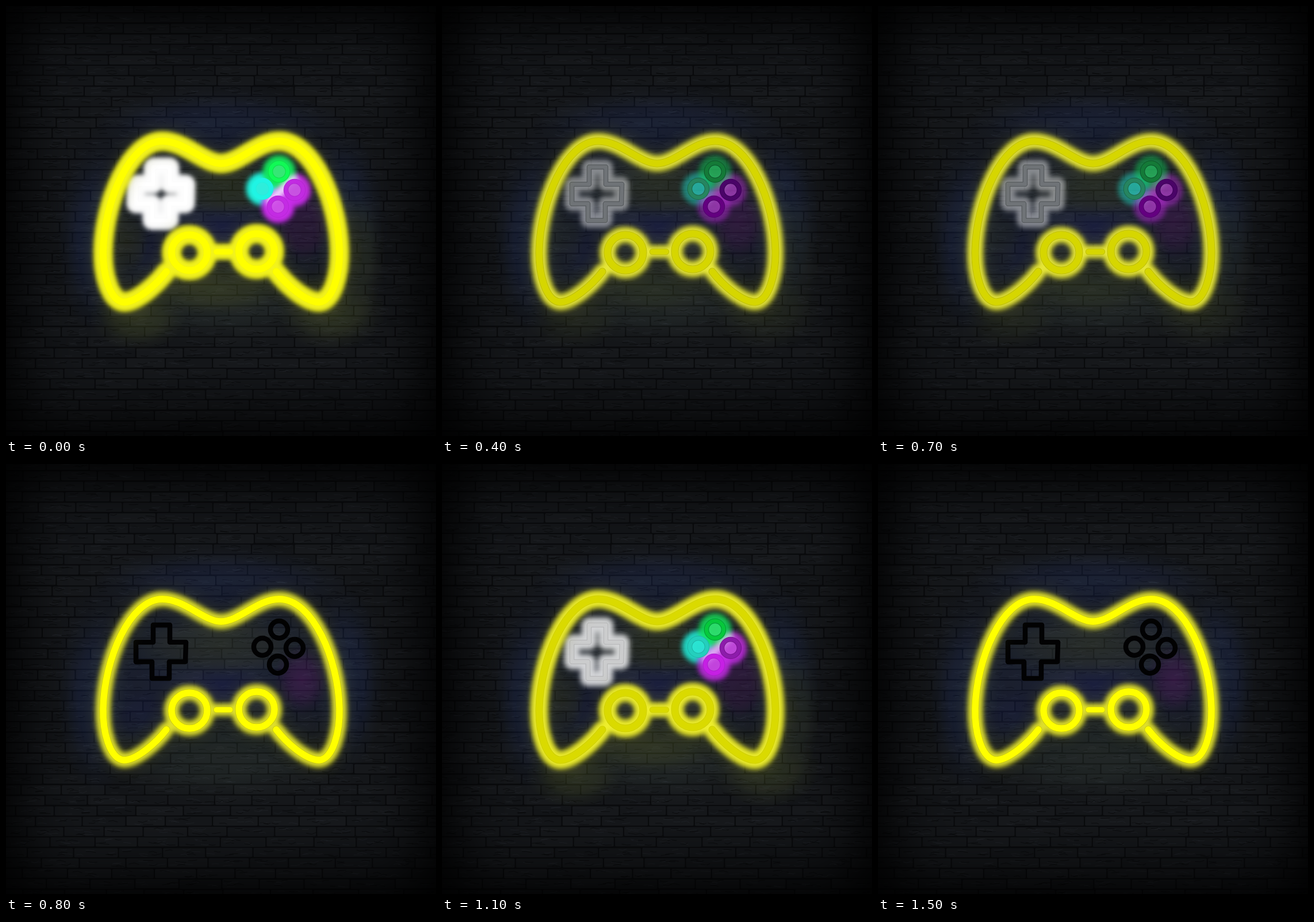
An HTML page with a canvas that plays this animation: 748 by 748 pixels, repeating every 1.6 s.

```html
<!DOCTYPE html>
<html lang="en">
<head>
<meta charset="utf-8">
<title>Neon gamepad</title>
<style>
html, body { margin: 0; width: 100%; height: 100%; overflow: hidden; background: #000; }
#stage { position: relative; width: 748px; height: 748px; overflow: hidden; isolation: isolate; }
#stage > * { position: absolute; left: 0; top: 0; width: 748px; height: 748px; }
#shade { box-shadow: inset 0 0 100px 28px #000; }
#air { mix-blend-mode: screen; }
path, circle, line { fill: none; stroke-linecap: round; stroke-linejoin: round; }
.soft { filter: blur(4.5px); }
.haze { filter: blur(12px); }
</style>
</head>
<body>
<div id="stage">
  <canvas id="wall" width="748" height="748"></canvas>
  <div id="shade"></div>
  <svg id="air" viewBox="0 0 748 748"></svg>
  <svg id="sign" viewBox="0 0 748 748"></svg>
</div>
<script>
const FRAME = 100, COUNT = 16;
// Brightness stage per step: 0 fully lit, 1 dimming, 2 faint, 3 off.
const FLICKER = [0, .5, 1, 1.5, 2, 2.5, 3, 2, 3];

const air = document.getElementById('air');
const sign = document.getElementById('sign');

function add(parent, tag, attrs = {}) {
  const el = document.createElementNS('http://www.w3.org/2000/svg', tag);
  for (const key in attrs) el.setAttribute(key, attrs[key]);
  return parent.appendChild(el);
}

const rgb = hex => [1, 3, 5].map(i => parseInt(hex.slice(i, i + 2), 16));
const lerp = (a, b, t) => a + (b - a) * t;

function mix(a, b, t) {
  if (typeof a === 'number') return lerp(a, b, t);
  const q = rgb(b);
  return `rgb(${rgb(a).map((v, i) => Math.round(lerp(v, q[i], t))).join(',')})`;
}

function flicker(el, prop, stages) {
  const frames = [];
  for (let i = 0; i <= COUNT; i++) {
    const k = FLICKER[Math.min(i, COUNT - 1) % FLICKER.length];
    const lo = Math.floor(k), hi = Math.ceil(k);
    frames.push({ [prop]: mix(stages[lo], stages[hi], k - lo), offset: i / COUNT, easing: 'step-end' });
  }
  el.animate(frames, { duration: FRAME * COUNT, iterations: Infinity }).startTime = 0;
}

function drawWall() {
  const c = document.getElementById('wall').getContext('2d');
  let seed = 71;
  const rnd = () => (seed = seed * 16807 % 2147483647) / 2147483647;
  c.fillStyle = '#0a0b0d';
  c.fillRect(0, 0, 748, 748);
  const rowH = 18.2;
  for (let row = 0; row < 42; row++) {
    const y = row * rowH - 6;
    let x = -(row % 2) * 38 - rnd() * 16;
    while (x < 748) {
      const w = 64 + rnd() * 20, v = 19 + rnd() * 4;
      c.fillStyle = `rgb(${v},${v + 2},${v + 5})`;
      c.beginPath();
      c.roundRect(x, y + rnd(), w - 2, rowH - 2.2, 2);
      c.fill();
      for (let n = 0; n < 6; n++) {
        const px = x + rnd() * (w - 18), py = y + 3 + rnd() * 11;
        c.strokeStyle = n % 2 ? 'rgba(0,0,0,.45)' : 'rgba(70,74,82,.18)';
        c.lineWidth = 1;
        c.beginPath();
        c.moveTo(px, py);
        c.lineTo(px + 5 + rnd() * 5, py + rnd() * 4 - 2);
        c.lineTo(px + 11 + rnd() * 7, py + rnd() * 4 - 2);
        c.stroke();
      }
      x += w;
    }
  }
}

const defs = add(air, 'defs');
let blobs = 0;
function blob(x, y, rx, ry, color, stages) {
  const id = 'b' + blobs++;
  const g = add(defs, 'radialGradient', { id });
  [[0, 1], [.5, .65], [.8, .18], [1, 0]].forEach(([offset, a]) =>
    add(g, 'stop', { offset, 'stop-color': color, 'stop-opacity': a }));
  const el = add(air, 'ellipse', { cx: x, cy: y, rx, ry, fill: `url(#${id})` });
  if (stages) flicker(el, 'opacity', stages);
}

function drawAir() {
  blob(374, 350, 300, 220, '#080d20');
  blob(374, 205, 220, 55, '#060b1c');
  blob(160, 410, 70, 160, '#070e24');
  blob(590, 380, 65, 160, '#070e24');
  blob(375, 385, 110, 50, '#080a28');
  blob(240, 445, 60, 60, '#060920');
  blob(370, 315, 190, 65, '#161912');
  blob(515, 375, 50, 62, '#260a32');
  blob(375, 500, 250, 90, '#0f130e');
  const warm = [1, .9, .5, 0];
  blob(230, 540, 85, 60, '#1e220c', warm);
  blob(565, 530, 95, 70, '#1e220c', warm);
  blob(360, 490, 140, 50, '#22260e', warm);
  blob(395, 315, 95, 48, '#14180a', warm);
  blob(210, 410, 45, 80, '#101208', warm);
  blob(610, 430, 50, 120, '#14170a', warm);
  blob(520, 395, 45, 55, '#14061c', warm);
}

const BODY = 'M279 462C262 484 228 515 205 515C180 513 168 465 169 425' +
  'C171 340 215 235 272 235C310 235 345 274 374 274C405 274 438 235 475 235' +
  'C534 235 578 340 580 425C581 465 569 513 545 515C521 515 487 484 470 462';

function tubes(parent, attrs) {
  const g = add(parent, 'g', attrs);
  add(g, 'path', { d: BODY });
  add(g, 'circle', { cx: 319, cy: 429, r: 31 });
  add(g, 'circle', { cx: 436, cy: 427, r: 31 });
  add(g, 'line', { x1: 366, y1: 427.5, x2: 390, y2: 427.5, 'stroke-width': attrs['stroke-width'] * .8 });
  return g;
}

function drawBody() {
  const haze = tubes(sign, { class: 'haze', 'stroke-width': 36, stroke: '#8a8a28' });
  flicker(haze, 'opacity', [.3, .27, .22, .18]);
  const halo = tubes(sign, { class: 'soft', 'stroke-width': 26 });
  flicker(halo, 'stroke', ['#f4f41c', '#e9e93c', '#e4e43c', '#dede2c']);
  const wide = tubes(sign, { class: 'soft', 'stroke-width': 32, stroke: '#f4f41c' });
  flicker(wide, 'opacity', [.9, .5, .15, 0]);
  const edge = tubes(sign, { 'stroke-width': 13 });
  flicker(edge, 'stroke', ['#f6f608', '#cccc08', '#b8b80c', '#c6c612']);
  const core = tubes(sign, { 'stroke-width': 11.4 });
  flicker(core, 'stroke', ['#ffff00', '#dada00', '#d6d600', '#ffff00']);
}

function lamp(shape, attrs, look) {
  const stroke = width => add(sign, shape, { ...attrs, 'stroke-width': width });
  flicker(stroke(8.5), 'stroke', look.edge);
  flicker(stroke(6.5), 'stroke', look.ring);
}

function glow(shape, attrs, width, color, stages) {
  flicker(add(sign, shape, { ...attrs, class: 'soft', 'stroke-width': width, stroke: color }), 'opacity', stages);
}

function drawPad() {
  const attrs = { d: 'M256 280H285V310H313L312 344H284V373H254V344H226V310H256Z' };
  glow('path', attrs, 25, '#f2f3f4', [1, .82, .5, 0]);
  glow('path', attrs, 32, '#ffffff', [.9, .15, 0, 0]);
  lamp('path', attrs, {
    edge: ['#fcfcfc', '#b2b3b4', '#505457', '#020203'],
    ring: ['#ffffff', '#cbcccd', '#6f7377', '#020203']
  });
}

const BUTTONS = [
  { x: 446, y: 318, glow: '#20f2de', mid: '#30eedd',
    edge: ['#22f0de', '#1fb5a6', '#1c6848', '#020203'],
    ring: ['#20f4e4', '#24cfbd', '#268560', '#020203'] },
  { x: 502, y: 320, glow: '#c42be4', mid: '#c957e2',
    edge: ['#b425d2', '#78128f', '#3c0058', '#020203'],
    ring: ['#c22be2', '#8d1cab', '#4a0468', '#020203'] },
  { x: 473, y: 349, glow: '#c92cea', mid: '#d052e8',
    edge: ['#b728d6', '#b01bd0', '#50006c', '#020203'],
    ring: ['#c42be4', '#c620e4', '#640080', '#020203'] },
  { x: 475, y: 288, glow: '#12e65c', mid: '#3ae879',
    edge: ['#0ee04a', '#05963a', '#0d552b', '#020203'],
    ring: ['#10fb58', '#06c93c', '#147a38', '#020203'] }
];

function drawButtons() {
  const at = b => ({ cx: b.x, cy: b.y, r: 15 });
  for (const b of BUTTONS) glow('circle', at(b), 27, b.glow, [1, .85, .45, 0]);
  glow('line', { x1: 460, y1: 339, x2: 500, y2: 301 }, 15, '#f0dcff', [.95, .7, .15, 0]);
  for (const b of BUTTONS) {
    const mid = add(sign, 'circle', { cx: b.x, cy: b.y, r: 11, style: `fill:${b.mid}` });
    flicker(mid, 'opacity', [.9, .65, .35, 0]);
    lamp('circle', at(b), b);
  }
}

drawWall();
drawAir();
drawPad();
drawButtons();
drawBody();
</script>
</body>
</html>
```
